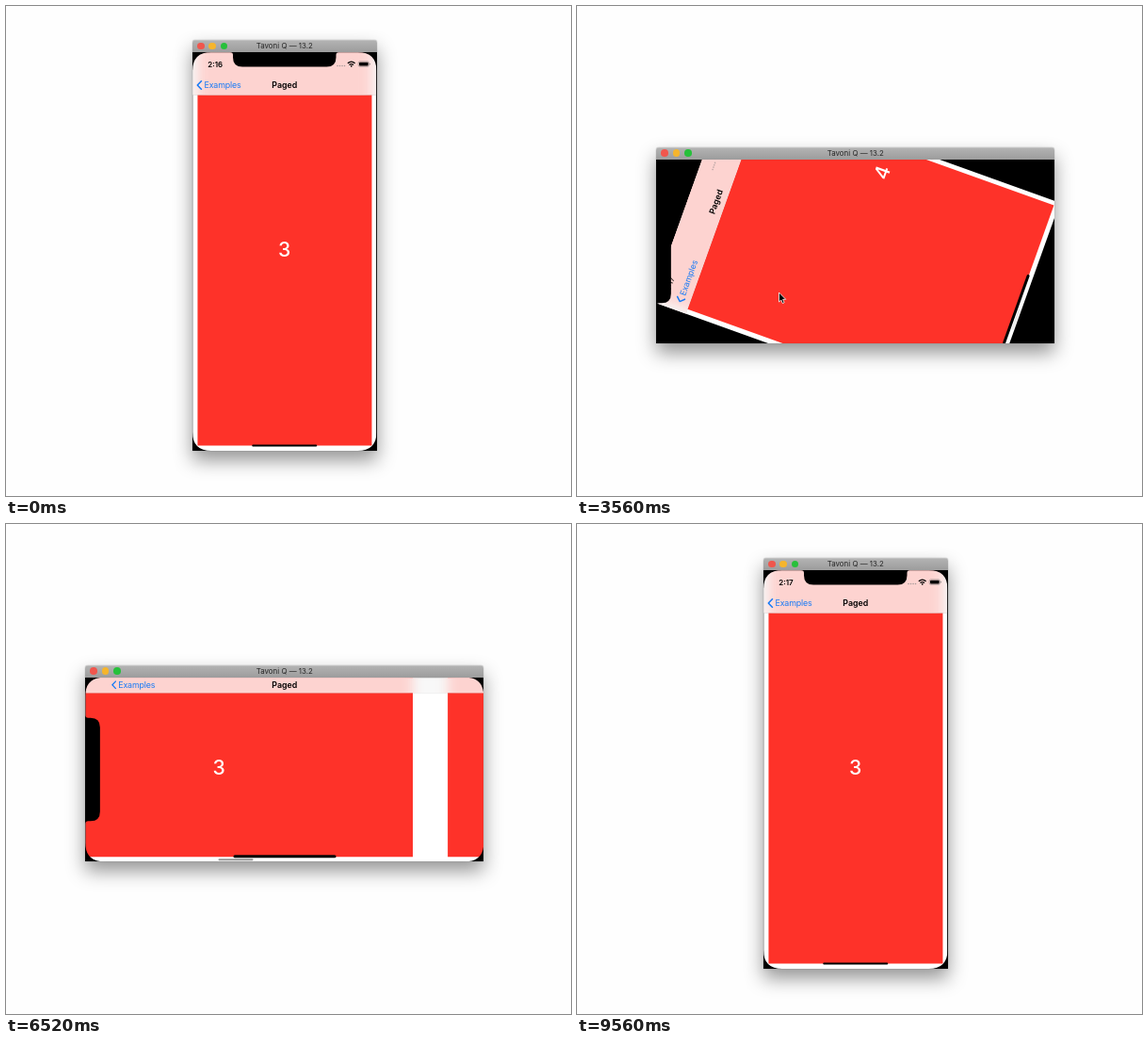
An HTML page that plays this animation: 600 by 520 pixels, repeating every 10 s.

```html
<!DOCTYPE html>
<html lang="en">
<head>
<meta charset="utf-8">
<title>Paged</title>
<style>
html, body { margin: 0; width: 100%; height: 100%; overflow: hidden; background: #fefefe; }
body { position: relative; font-family: Inter, "Liberation Sans", sans-serif; }
div, svg { position: absolute; }
#win {
  left: 198px; top: 36px; width: 195.5px; height: 436px;
  border-radius: 3px 3px 0 0;
  box-shadow: 0 10px 20px rgba(0,0,0,.42), 0 0 1px rgba(0,0,0,.5);
}
#win.wide { left: 84.25px; top: 149.75px; width: 423px; height: 208.5px; }
#bar {
  left: 0; top: 0; width: 100%; height: 13px;
  border-radius: 3px 3px 0 0;
  background: linear-gradient(#b4b4b4, #9c9c9c);
  box-shadow: inset 0 .5px #cfcfcf;
  font-size: 7.9px; line-height: 13px; text-align: center; color: #262626;
}
.light { top: 2.7px; width: 7.6px; height: 7.6px; border-radius: 50%; }
#screen { left: 0; top: 13px; right: 0; bottom: 0; background: #000; overflow: hidden; }
#app { left: 50%; top: 50%; background: #fff; overflow: hidden; }
.page { left: 0; top: 0; bottom: 5.2px; background: #fe3229; }
.num {
  left: 50%; top: 50%; width: 40px; height: 30px; margin: -15px 0 0 -20px;
  font-size: 21.2px; font-weight: 500; line-height: 30px; text-align: center; color: #fff;
}
#nav { left: 0; top: 0; width: 100%; background: #f8f8f8; overflow: hidden; }
#tint { left: 0; top: -30px; bottom: -30px; width: 100%; filter: blur(6px); }
#tint .page { bottom: 0; background: #fdd3d0; }
#line { left: 0; bottom: 0; width: 100%; height: .5px; background: rgba(0,0,0,.25); }
#heads { left: 0; width: 100%; height: 12px; margin-top: -6px; font-size: 8.86px; line-height: 12px; }
#title { width: 100%; text-align: center; font-weight: 600; color: #000; }
#back { top: 0; color: #1479f6; letter-spacing: -.015em; white-space: nowrap; }
#back span { position: absolute; left: 8.2px; }
#back svg { left: 0; top: .5px; }
#status { left: 0; top: 0; width: 195.5px; height: 24px; }
#clock { left: 16.3px; top: 7px; font-size: 7.9px; line-height: 10px; font-weight: 600; }
#home { left: 50%; bottom: 4.2px; height: 2.6px; border-radius: 2px; background: #000; }
#thumb { bottom: 1.5px; height: 1.6px; border-radius: 1px; background: #969696; }
#mask { left: 50%; top: 50%; width: 195.5px; height: 423px; margin: -211.5px 0 0 -97.75px; overflow: visible; }
.wide #mask { transform: rotate(-90deg); }
#cursor { left: 0; top: 0; overflow: visible; }
</style>
</head>
<body>
<div id="win">
  <div id="bar">
    <div class="light" style="left:5.2px;background:#f0564d"></div>
    <div class="light" style="left:17.4px;background:#f6b52c"></div>
    <div class="light" style="left:29.7px;background:#27c03b"></div>
    Tavoni Q — 13.2
  </div>
  <div id="screen">
    <div id="app">
      <div id="pages"></div>
      <div id="nav">
        <div id="tint"></div>
        <div id="line"></div>
        <div id="heads">
          <div id="title">Paged</div>
          <div id="back">
            <svg id="chevron" width="7" height="11" viewBox="0 0 7 11">
              <path d="M5.6 .7 1 5.5 5.6 10.3" fill="none" stroke="#1479f6" stroke-width="1.5"/>
            </svg>
            <span>Examples</span>
          </div>
        </div>
      </div>
      <div id="status">
        <div id="clock">2:16</div>
        <svg width="195.5" height="24">
          <g fill="#a89a9a">
            <circle cx="153.8" cy="14" r=".8"/><circle cx="156.3" cy="14" r=".8"/>
            <circle cx="158.8" cy="14" r=".8"/><circle cx="161.3" cy="14" r=".8"/>
          </g>
          <g fill="none" stroke="#000" stroke-width="1.2">
            <path d="M164.6 11.3q3.9-3.4 7.8 0"/>
            <path d="M166.2 13q2.3-1.9 4.6 0"/>
          </g>
          <circle cx="168.5" cy="14.3" r=".9"/>
          <rect x="176" y="9.4" width="11.2" height="5.4" rx="1.5" fill="none" stroke="#777" stroke-width=".5"/>
          <rect x="176.8" y="10.2" width="9.6" height="3.8" rx=".8"/>
          <rect x="187.7" y="11.2" width=".8" height="1.8" rx=".4" fill="#777"/>
        </svg>
      </div>
      <div id="home"></div>
      <div id="thumb"></div>
    </div>
    <svg id="mask" viewBox="0 0 195.5 423">
      <path fill-rule="evenodd" d="M-1-1H196.5V424H-1ZM20 0H40Q43 0 43 3V5.6Q43 15.6 53 15.6H142.5Q152.5 15.6 152.5 5.6V3Q152.5 0 155.5 0H175.5Q195.5 0 195.5 20V403Q195.5 423 175.5 423H20Q0 423 0 403V20Q0 0 20 0Z"/>
    </svg>
  </div>
</div>
<svg id="cursor" width="8" height="12">
  <path d="M0 0V10L2.3 8 3.8 11.5 5.6 10.7 4.1 7.3H7.2Z" stroke="#fff" stroke-width=".8"/>
</svg>
<script>
const LOOP = 10000, INSET = 5.2, GAP = 36.5, SLOP = 5, TAU = 200;
const TURN = 3400, UNTURN = 8040, SPIN = 400;
const RELEASE_1 = 1760, RELEASE_2 = 6240;
const $ = id => document.getElementById(id);
const lerp = (a, b, k) => a + (b - a) * k;
const clamp = x => Math.min(1, Math.max(0, x));
const ramp = (t, start, length) => clamp((t - start) / length);
const smooth = x => x * x * (3 - 2 * x);
const ease = (t, start, length) => smooth(ramp(t, start, length));
const px = v => v.toFixed(3) + 'px';

function add(parent, cls, text = '') {
  const el = document.createElement('div');
  el.className = cls;
  el.textContent = text;
  return parent.appendChild(el);
}
const pages = [2, 3, 4, 5].map(i => {
  const body = add($('pages'), 'page');
  return { i, body, num: add(body, 'num', i), tint: add($('tint'), 'page') };
});

const dragLeft = t => 343 - 128.5 * ease(t, 1440, 400);
const dragRight = t => 298 + 180 * ease(t, 5760, 560);

// Scroll position in pages: drag, then settle on the nearest page.
function scroll(t) {
  const settle = (from, to, t0) => to + (from - to) * Math.exp((t0 - t) / TAU);
  const first = u => 3 + Math.max(0, 343 - dragLeft(u) - SLOP) / 221.5;
  const second = u => 4 - Math.max(0, dragRight(u) - 298 - SLOP) / 449;
  if (t < RELEASE_1) return first(t);
  if (t < 3320) return settle(first(RELEASE_1), 4, RELEASE_1);
  if (t < RELEASE_2) return second(t);
  if (t < 7480) return settle(second(RELEASE_2), 3, RELEASE_2);
  return 3;
}

function pointer(t) {
  if (t < 1440) {
    const k = ease(t, 120, 960);
    return [lerp(602, 343, k), lerp(262, 298, k)];
  }
  if (t < 4720) return [dragLeft(t), lerp(298, 304, ease(t, 1600, 300))];
  if (t < 5700) {
    const k = ease(t, 4720, 840);
    return [lerp(214.5, 298, k), lerp(304, 298, k)];
  }
  return [dragRight(t), 298];
}

function draw(t) {
  const wide = t >= TURN && t < UNTURN;
  const there = ease(t, TURN + 40, SPIN), home = ease(t, UNTURN + 40, SPIN);
  const k = there - home;
  const angle = wide ? -90 * (1 - there) : t >= UNTURN ? 90 * (1 - home) : 0;
  const w = lerp(195.5, 423, k), h = lerp(423, 195.5, k);
  const pw = w - 2 * INSET, pos = scroll(t);

  $('win').className = wide ? 'wide' : '';
  const app = $('app').style;
  app.width = px(w);
  app.height = px(h);
  app.transform = `translate(-50%, -50%) rotate(${angle.toFixed(3)}deg)`;
  $('pages').style.width = px(w);
  $('pages').style.height = px(h);

  // While turning, the number already sits at the middle of the final page.
  const turning = k > 0 && k < 1;
  const shift = turning ? ((wide ? 423 : 195.5) - w) / 2 : 0;
  for (const p of pages) {
    const x = INSET + (p.i - pos) * (pw + GAP);
    for (const el of [p.body, p.tint]) {
      el.style.width = px(pw);
      el.style.transform = `translateX(${px(x)})`;
    }
    p.num.style.transform = `translateX(${px(shift)})`;
  }

  $('nav').style.height = px(lerp(45.8, 16.7, k));
  $('heads').style.top = px(lerp(34.5, 8, k));
  $('back').style.left = px(lerp(4.3, 26.8, k));
  $('chevron').style.transform = `scale(${lerp(1, .85, k)})`;
  $('status').style.opacity = 1 - k;
  $('clock').textContent = t < 560 ? '2:16' : '2:17';

  const bar = lerp(69.8, 108.8, k);
  $('home').style.width = px(bar);
  $('home').style.marginLeft = px(-bar / 2);

  const tw = lerp(19, 37, k);
  const thumb = $('thumb').style;
  thumb.width = px(tw);
  thumb.left = px((w - tw) / 2 + (pos - 4.5) * lerp(15.5, 38.7, k) - 25 * home);
  thumb.opacity = ramp(t, 1440, 80) - ramp(t, TURN, 200)
    + ramp(t, 5800, 80) - ramp(t, 9100, 140);

  const [cx, cy] = pointer(t);
  $('cursor').style.transform = `translate(${px(cx)}, ${px(cy)})`;
  $('cursor').style.visibility = t >= 120 && t < 6400 ? 'visible' : 'hidden';
}

const start = performance.now();
function tick() {
  draw((performance.now() - start) % LOOP);
  requestAnimationFrame(tick);
}
tick();
</script>
</body>
</html>
```
